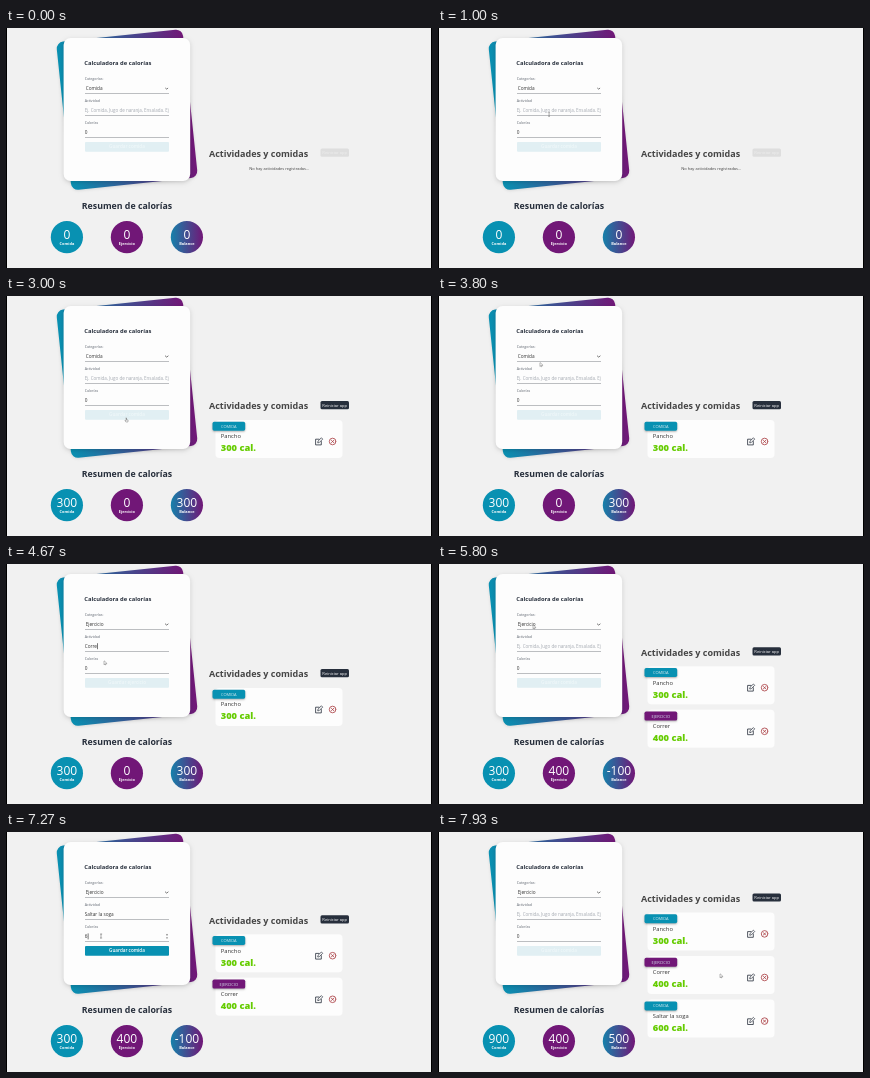
Write an HTML page with a canvas that moves like this. It is 426 by 240 pixels and loops after 8000 ms.

```html
<!DOCTYPE html>
<html lang="es">
<head>
<meta charset="utf-8">
<title>Calculadora de calorías</title>
<style>
  html, body { margin: 0; width: 100%; height: 100%; overflow: hidden; background: #f1f1f1; }
  canvas { display: block; width: 426px; height: 240px; }
</style>
</head>
<body>
<canvas id="stage" width="426" height="240"></canvas>
<script>
const ctx = document.getElementById('stage').getContext('2d');
const LOOP = 8000;
const CYAN = '#0891b2', PURPLE = '#711777', INK = '#272f3c', GREY = '#a3a8b0';
const FONT = '"Open Sans", "Noto Sans", sans-serif';

const entries = [
  { type: 'Comida', name: 'Pancho', kcal: 300, nameAt: 1400, step: 105, kcalAt: 2430, saveAt: 2870 },
  { type: 'Ejercicio', name: 'Correr', kcal: 400, nameAt: 4270, step: 85, kcalAt: 5050, saveAt: 5400 },
  { type: 'Comida', name: 'Saltar la soga', kcal: 600, nameAt: 6380, step: 55, kcalAt: 7270, saveAt: 7600 }
];
const PICK_AT = 3900;
const clicks = [1200, 2130, 2830, 3620, 4160, 5360, 6230, 7560];

// time, x, y
const pointer = [
  [130, 328, 125], [400, 203, 112], [600, 203, 112], [1130, 95, 82],
  [1900, 95, 82], [2070, 95.5, 104], [2600, 95.5, 104], [2800, 120.5, 124],
  [3270, 120.5, 124], [3560, 110, 61], [3660, 110, 61], [3880, 100, 72],
  [4130, 95, 82], [4400, 95, 82], [4600, 99, 99], [4700, 99, 99], [4930, 99, 104],
  [5180, 99, 104], [5330, 120.5, 122], [5450, 120.5, 122], [5780, 96, 63],
  [5950, 96, 63], [6200, 90, 82], [7120, 90, 82], [7220, 95, 104],
  [7440, 95, 104], [7550, 120.5, 122], [7630, 120.5, 122], [7900, 283, 144]
];

function box(x, y, w, h, r, fill) {
  ctx.beginPath();
  ctx.roundRect(x, y, w, h, r);
  ctx.fillStyle = fill;
  ctx.fill();
}

function shadowBox(x, y, w, h, r, fill, blur, drop, alpha) {
  ctx.save();
  ctx.shadowColor = `rgba(0,0,0,${alpha})`;
  ctx.shadowBlur = blur;
  ctx.shadowOffsetY = drop;
  box(x, y, w, h, r, fill);
  ctx.restore();
}

function disc(x, y, r, fill) {
  ctx.beginPath();
  ctx.arc(x, y, r, 0, 7);
  ctx.fillStyle = fill;
  ctx.fill();
}

function text(str, x, y, size, color = INK, weight = 400, align = 'left') {
  ctx.font = `${weight} ${size}px ${FONT}`;
  ctx.textAlign = align;
  ctx.fillStyle = color;
  ctx.fillText(str, x, y);
  return ctx.measureText(str).width;
}

function trace(points, close) {
  ctx.beginPath();
  points.forEach(([x, y]) => ctx.lineTo(x, y));
  if (close) ctx.closePath();
}

function stroke(points, color, width, close) {
  trace(points, close);
  ctx.strokeStyle = color;
  ctx.lineWidth = width;
  ctx.stroke();
}

function poly(points, fill) {
  trace(points, true);
  ctx.fillStyle = fill;
  ctx.fill();
}

function blend(x0, x1) {
  const g = ctx.createLinearGradient(x0, 0, x1, 0);
  g.addColorStop(0, CYAN);
  g.addColorStop(1, PURPLE);
  return g;
}

function typed(str, start, step, t) {
  return t < start ? '' : str.slice(0, Math.floor((t - start) / step) + 1);
}

function drawCards() {
  ctx.save();
  ctx.translate(121, 81.8);
  ctx.rotate(-6 * Math.PI / 180);
  shadowBox(-63.5, -74.5, 127, 149, 7, blend(-63.5, 63.5), 3, 1, 0.1);
  ctx.restore();
  shadowBox(57.6, 10, 126.6, 143, 7, '#fdfdfd', 4, 1.5, 0.16);
}

function field(label, y) {
  text(label, 78.7, y - 12.6, 3.6, '#5f6670');
  ctx.fillStyle = '#bcbec1';
  ctx.fillRect(79, y, 84, 1);
}

function caret(x, y) {
  ctx.fillStyle = '#222';
  ctx.fillRect(x, y - 5, 0.6, 6);
}

function drawForm(t, mouse) {
  const entry = entries.find(e => t < e.saveAt);
  const name = entry ? typed(entry.name, entry.nameAt, entry.step, t) : '';
  const kcal = entry ? typed(String(entry.kcal), entry.kcalAt, 70, t) : '';
  const picked = t < PICK_AT ? 'Comida' : 'Ejercicio';
  const ink = '#333';

  text('Calculadora de calorías', 78.3, 37.4, 5.8, INK, 700);

  field('Categorías:', 65);
  text(picked, 79.7, 62.1, 4.7, ink);
  stroke([[159.3, 60], [160.7, 61.1], [162.1, 60]], '#555', 0.8);

  field('Actividad', 87);
  if (name) {
    const w = text(name, 78.7, 84.2, 4.7, ink);
    if (t < entry.kcalAt - 350) caret(79.1 + w, 84.2);
  } else {
    ctx.save();
    ctx.beginPath();
    ctx.rect(78, 76, 85, 11);
    ctx.clip();
    text('Ej. Comida, Jugo de naranja, Ensalada. Ejercicio', 78.7, 84.2, 4.5, GREY);
    ctx.restore();
  }

  field('Calorías', 109);
  const w = text(kcal || '0', 78.7, 106.4, 4.7, ink);
  if (kcal) caret(79.1 + w, 106.4);
  if (mouse.over === 'kcal') {
    poly([[160, 103.2], [162, 103.2], [161, 101.8]], '#555');
    poly([[160, 105.4], [162, 105.4], [161, 106.8]], '#555');
  }

  const ready = name && kcal;
  box(79, 114, 84, 9.7, 1, ready ? CYAN : '#e1eff3');
  const kind = t >= PICK_AT && t < entries[1].saveAt ? 'ejercicio' : 'comida';
  text('Guardar ' + kind, 121, 120.4, 4.6, ready ? '#fff' : '#eff7f9', 600, 'center');

  if (t > 6330 && t < 6530) {
    shadowBox(104.5, 90, 41.5, 12, 1, '#16181d', 2, 1, 0.3);
    text('Pancho', 108, 97.2, 3.4, '#eee');
  }
}

function drawSummary(saved) {
  text('Resumen de calorías', 121, 181.3, 8.8, INK, 700, 'center');
  const sum = type => saved.filter(e => e.type === type).reduce((n, e) => n + e.kcal, 0);
  const eaten = sum('Comida'), burnt = sum('Ejercicio');
  const rings = [['Comida', eaten, CYAN], ['Ejercicio', burnt, PURPLE], ['Balance', eaten - burnt, blend(160, 197)]];
  rings.forEach(([label, value, fill], i) => {
    const x = 60.9 + 60 * i;
    disc(x, 209.2, 16.1, fill);
    text(value, x, 210.9, 12, '#fff', 400, 'center');
    text(label, x, 216.6, 3.9, '#fff', 700, 'center');
  });
}

function pencil(x, y) {
  ctx.lineCap = ctx.lineJoin = 'round';
  stroke([[x, y - 2.3], [x - 3.4, y - 2.3], [x - 3.4, y + 3.4], [x + 2.3, y + 3.4], [x + 2.3, y]], INK, 0.8);
  stroke([[x - 1.3, y + 1.3], [x - 0.9, y - 0.5], [x + 2.4, y - 3.7], [x + 3.7, y - 2.4], [x + 0.5, y + 0.8]], INK, 0.7, true);
}

function crossCircle(x, y) {
  const red = '#a8383d';
  ctx.beginPath();
  ctx.arc(x, y, 3.3, 0, 7);
  ctx.strokeStyle = red;
  ctx.lineWidth = 0.8;
  ctx.stroke();
  for (const s of [-1, 1]) stroke([[x - 1.2, y - 1.2 * s], [x + 1.2, y + 1.2 * s]], red, 0.8);
}

function drawList(saved) {
  const n = saved.length;
  const mid = n ? 131.8 - 21.8 * n : 125.5;
  text('Actividades y comidas', 203, mid + 3.4, 9, '#454545', 700);
  box(314.5, mid - 5, 28.5, 8.2, 1.5, n ? INK : '#dedede');
  text('Reiniciar app', 328.7, mid + 0.6, 4.1, n ? '#fff' : '#eee', 400, 'center');
  if (!n) text('No hay actividades registradas...', 273.2, 142.3, 4, '#444', 400, 'center');

  saved.forEach((e, i) => {
    const y = mid + 14 + 43.6 * i;
    box(209.5, y, 127, 38, 4, '#fdfdfd');
    shadowBox(206.5, y + 1.8, 32.7, 9, 1.7, e.type === 'Comida' ? CYAN : PURPLE, 2, 1, 0.3);
    text(e.type.toUpperCase(), 222.8, y + 7.7, 4, '#d8eaf0', 400, 'center');
    text(e.name, 214.8, y + 18.3, 5.8, '#333');
    text(e.kcal + ' cal.', 214.7, y + 31.4, 9.3, '#65cc00', 800);
    pencil(313, y + 21.5);
    crossCircle(326.6, y + 21.5);
  });
}

function pointerAt(t) {
  let i = 0;
  while (i < pointer.length - 2 && t > pointer[i + 1][0]) i++;
  const [t0, x0, y0] = pointer[i], [t1, x1, y1] = pointer[i + 1];
  const k = Math.min(1, Math.max(0, (t - t0) / (t1 - t0)));
  const e = k * k * (3 - 2 * k);
  const x = x0 + (x1 - x0) * e, y = y0 + (y1 - y0) * e;
  const inside = (top, bottom) => x > 79 && x < 163 && y > top && y < bottom;
  const over = inside(77, 88) ? 'name' : inside(100, 110) ? 'kcal' : inside(114, 125) ? 'save' : '';
  return { x, y, over };
}

function drawPointer(t, { x, y, over }) {
  if (t < 130) return;
  if (clicks.some(c => t >= c && t < c + 90)) {
    const glow = ctx.createRadialGradient(x, y, 0, x, y, 4.6);
    glow.addColorStop(0, '#666');
    glow.addColorStop(0.4, 'rgba(120,120,120,.8)');
    glow.addColorStop(0.8, 'rgba(150,150,150,.55)');
    glow.addColorStop(1, 'rgba(170,170,170,0)');
    disc(x, y, 4.6, glow);
  }
  const edge = '#555';
  if (over === 'name' || over === 'kcal') {
    stroke([[x, y - 2], [x, y + 2]], edge, 0.5);
    for (const d of [-2, 2]) stroke([[x - 0.8, y + d], [x + 0.8, y + d]], edge, 0.4);
  } else if (over === 'save') {
    const hand = [[x - 0.7, y - 2], [x, y - 2], [x, y - 0.3], [x + 1.6, y], [x + 1.4, y + 2], [x - 0.6, y + 2], [x - 1.6, y + 0.4], [x - 0.7, y + 0.4]];
    poly(hand, '#fff');
    stroke(hand, edge, 0.4, true);
  } else {
    const arrow = [[x - 1, y - 2], [x - 1, y + 1.8], [x, y + 0.9], [x + 0.6, y + 2], [x + 1, y + 1.7], [x + 0.5, y + 0.7], [x + 1.7, y + 0.6]];
    poly(arrow, '#fff');
    stroke(arrow, edge, 0.4, true);
  }
}

function draw(now) {
  const t = now % LOOP;
  const saved = entries.filter(e => t >= e.saveAt);
  const mouse = pointerAt(t);
  ctx.fillStyle = '#f1f1f1';
  ctx.fillRect(0, 0, 426, 240);
  drawCards();
  drawForm(t, mouse);
  drawSummary(saved);
  drawList(saved);
  drawPointer(t, mouse);
  ctx.fillStyle = '#000';
  for (const x of [0, 425]) ctx.fillRect(x, 0, 1, 240);
}

const began = performance.now();
function tick() {
  draw(performance.now() - began);
  requestAnimationFrame(tick);
}
tick();
</script>
</body>
</html>
```
